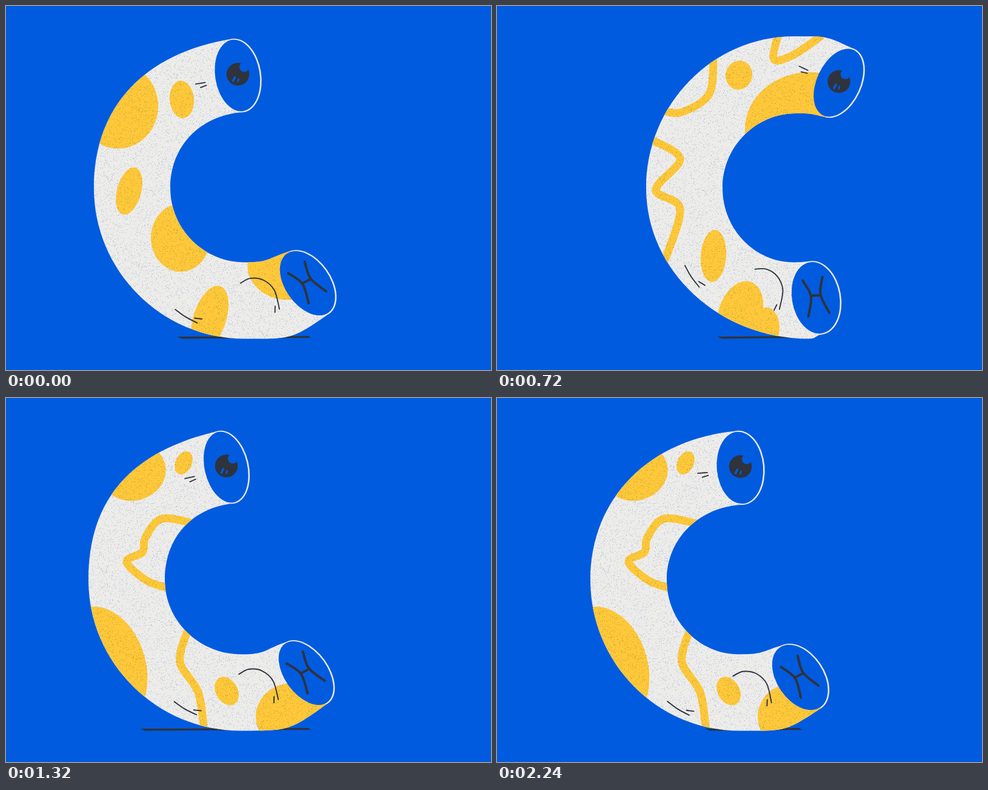
Write an HTML page with a canvas that moves like this. It is 800 by 600 pixels and loops after 2.37 s.

```html
<!DOCTYPE html>
<html lang="en">
<head>
<meta charset="utf-8">
<title>Swaying C</title>
<style>
  html, body { margin: 0; width: 100%; height: 100%; overflow: hidden; background: #005bdf; }
  canvas { display: block; width: 800px; height: 600px; }
</style>
</head>
<body>
<canvas id="stage" width="800" height="600"></canvas>
<script>
const BLUE = '#005bdf', PAPER = '#edece9', YELLOW = '#ffc83a', INK = '#2f333d';
const ctx = document.getElementById('stage').getContext('2d');
const rad = deg => deg * Math.PI / 180;

// A pose is the left edge, the start of the ground line and the two open ends.
const end = (x, y, rx, deg) => ({ x, y, rx, ry: 61, deg });
const pose = (left, ground, eye, mouth) => ({ left, ground, eye, mouth });
const low = pose(145, 282, end(382.5, 114.5, 38, -9), end(498, 457, 38, -35));
const rise = pose(155, 291, end(402, 115.5, 41.5, -5), end(500, 460.5, 39.5, -33));
const tip = pose(229, 336, end(532, 122.5, 40, 16), end(524, 481.5, 39.5, -14));
const peak = pose(246, 363, end(564, 126.5, 37, 25), end(526.5, 481, 40.5, -10));
const fall = pose(154, 343, end(401.5, 115, 39.5, -5), end(500.5, 460.5, 39.5, -34));

function mix(a, b, t) {
  if (typeof a === 'number') return a + (b - a) * t;
  return Object.fromEntries(Object.keys(a).map(k => [k, mix(a[k], b[k], t)]));
}
const back = mix(low, fall, -1);
const near = mix(tip, peak, .7);
const turn = mix(fall, peak, .55);

// Coats, with x counted from the left edge: spots are x, y, rx, ry, tilt; bands are curves.
const cow = {
  spots: [[40, 165, 66, 70, 0], [145, 154, 20, 31, -5], [58, 305, 20, 40, 15],
    [143, 382, 49, 56, 0], [191, 515, 27, 56, 18], [315, 432, 62, 52, 10]],
  bands: []
};
const cap = {
  spots: [[150, 100, 115, 64, -12], [67, 243, 38, 29, -35], [120, 322, 46, 46, 0],
    [10, 420, 58, 96, -18], [150, 454, 26, 35, -25], [243, 443, 26, 53, -4], [234, 563, 58, 47, 0]],
  bands: []
};
const cloud = {
  spots: [[61, 138, 41, 25, 10], [16, 304, 42, 37, 0], [20, 372, 51, 48, 0],
    [176, 428, 48, 66, 20], [193, 510, 13, 21, 38]],
  bands: ['101 89 156 108 209 82 221 48', '218 182 171 172 135 192 91 186 85 215 133 264']
};
const zigzag = {
  spots: [[153, 114, 22, 24, 15], [270, 203, 107, 94, 0], [111, 412, 21, 43, 4],
    [155, 508, 36, 56, 18], [198, 530, 22, 33, 0]],
  bands: ['218 46 211 88 244 80 288 50', '111 86 104 145 59 175 28 173', '8 220 56 252 16 303 56 335 29 424']
};
const river = {
  spots: [[74, 122, 54, 47, -15], [157, 107, 13.5, 20, 25], [21, 445, 74, 103, -15],
    [228, 483, 18, 25, -30], [336, 525, 60, 55, 0]],
  bands: ['176 207 121 199 94 230 89 254 63 270 96 301 134 314', '164 382 151 435 181 485 191 550']
};

const goRight = [[rise, cap, 130], [tip, cloud, 130], [near, cloud, 130]];
const goLeft = [[turn, zigzag, 130], [fall, river, 130], [low, cow, 130], [back, river, 200]];
const blink = [[peak, zigzag, 70], [peak, zigzag, 70, true], [peak, zigzag, 70]];
const steps = [
  ...goLeft.slice(2), ...goRight, ...blink,
  ...goLeft, ...goRight, [peak, zigzag, 200], ...goLeft.slice(0, 2)
];
const loop = steps.reduce((sum, s) => sum + s[2], 0);

function makeGrain() {
  const tile = document.createElement('canvas'), g = tile.getContext('2d');
  tile.width = tile.height = 256;
  g.fillStyle = '#c6d6f0';
  let seed = 7;
  const rnd = () => (seed = seed * 16807 % 2147483647) / 2147483647;
  for (let i = 0; i < 5000; i++) g.fillRect(rnd() * 256 | 0, rnd() * 256 | 0, 1, 1);
  return ctx.createPattern(tile, 'repeat');
}
const grain = makeGrain();

// Catmull-Rom curve through "x y x y ..."
function line(text, width, color) {
  const n = text.split(' ').map(Number), last = n.length / 2 - 1;
  const at = i => {
    const j = 2 * Math.min(last, Math.max(0, i));
    return [n[j], n[j + 1]];
  };
  ctx.beginPath();
  ctx.moveTo(...at(0));
  for (let i = 0; i < last; i++) {
    const z = at(i - 1), a = at(i), b = at(i + 1), c = at(i + 2);
    ctx.bezierCurveTo(a[0] + (b[0] - z[0]) / 6, a[1] + (b[1] - z[1]) / 6,
      b[0] - (c[0] - a[0]) / 6, b[1] - (c[1] - a[1]) / 6, ...b);
  }
  ctx.lineWidth = width;
  ctx.strokeStyle = color;
  ctx.stroke();
}
function oval(x, y, rx, ry, deg, color) {
  ctx.beginPath();
  ctx.ellipse(x, y, rx, ry, rad(deg), 0, 7);
  ctx.fillStyle = color;
  ctx.fill();
}

// Point on an end's rim where the tangent has the given angle; side 1 is the top.
function rim(e, side, angle) {
  const a = rad(angle - e.deg), r = rad(e.deg);
  const nx = Math.sin(a) * e.rx, ny = -Math.cos(a) * e.ry, len = Math.hypot(nx, ny) * side;
  const u = e.rx * nx / len, v = e.ry * ny / len;
  return [e.x + u * Math.cos(r) - v * Math.sin(r), e.y + u * Math.sin(r) + v * Math.cos(r)];
}
// Round curve from p, leaving at angle a, to q, arriving at angle b
function swing(p, a, q, b) {
  const dx = Math.abs(q[0] - p[0]), dy = Math.abs(q[1] - p[1]);
  const handle = (from, angle, sign) => {
    const c = Math.cos(rad(angle)), s = Math.sin(rad(angle));
    const k = .55 * sign * (dx * Math.abs(c) + dy * Math.abs(s));
    return [from[0] + c * k, from[1] + s * k];
  };
  ctx.bezierCurveTo(...handle(p, a, 1), ...handle(q, b, -1), ...q);
}
function bodyPath({ left, eye, mouth }) {
  const tilt = eye.deg, droop = mouth.deg;
  const brow = rim(eye, 1, tilt), lid = rim(eye, -1, tilt / 2);
  const chin = rim(mouth, -1, droop), lip = rim(mouth, 1, droop / 2);
  const crown = tilt > 0 ? [brow[0] - 4 * tilt, 50] : brow;
  const throat = tilt > 0 ? [lid[0] - 2 * tilt, 177] : lid;
  const spine = [left, 300], belly = [left + 126, 300];
  const foot = [mouth.x + 25 + 3.7 * droop, 548.5];
  const lap = [mouth.x - 10 + 2.7 * droop, 422.5];
  ctx.beginPath();
  ctx.moveTo(...brow);
  swing(brow, 180 + tilt, crown, 180);
  swing(crown, 180 + Math.min(0, tilt), spine, 90);
  swing(spine, 90, foot, 0);
  swing(foot, 0, chin, droop);
  ctx.lineTo(...lip);
  swing(lip, 180 + droop / 2, lap, 180);
  swing(lap, 180, belly, 270);
  swing(belly, 270, throat, Math.min(0, tilt / 2));
  swing(throat, 0, lid, tilt / 2);
  ctx.closePath();
}

function drawGround(from) {
  ctx.beginPath();
  ctx.moveTo(from, 545);
  ctx.lineTo(499, 544);
  ctx.lineTo(503, 547);
  ctx.lineTo(from + 8, 548.5);
  ctx.fillStyle = INK;
  ctx.fill();
}
function drawCoat({ spots, bands }, left) {
  ctx.save();
  ctx.translate(left, 0);
  spots.forEach(spot => oval(...spot, YELLOW));
  bands.forEach(band => line(band, 13, YELLOW));
  ctx.globalCompositeOperation = 'multiply';
  ctx.fillStyle = grain;
  ctx.fillRect(-left, 0, 800, 600);
  ctx.restore();
}
function drawPupil(x, y, shut) {
  ctx.save();
  ctx.translate(x, y);
  if (shut) {
    line('-18 1 0 8 18 1', 3.5, INK);
  } else {
    oval(0, 0, 18.7, 18.7, 0, INK);
    oval(10.5, -12, 8, 8, 0, BLUE);
    line('-8 11 -5 5', 3.5, BLUE);
    line('0 12 1 8', 2.5, BLUE);
  }
  ctx.restore();
}
// Pen strokes that turn with one end of the tube
function drawMarks(e, marks, width) {
  ctx.save();
  ctx.translate(e.x, e.y);
  ctx.rotate(rad(e.deg));
  marks.forEach(mark => line(mark, width, INK));
  ctx.restore();
}
const wrinkles = ['-71 3 -55 3', '-64 10 -54 8'];
const creases = ['-91 -64 -73 -61 -57 -46 -52 -22 -63 8', '-66 0 -72 8',
  '-204 -90 -197 -70 -187 -51', '-186 -60 -177 -52'];
const lips = ['-17 -32 -8 -4 -18 28', '16 -32 8 -4 17 28', '-8 -5 8 -3'];

function draw([p, coat, , shut]) {
  const ends = [p.eye, p.mouth];
  ctx.fillStyle = BLUE;
  ctx.fillRect(0, 0, 800, 600);
  ctx.lineCap = ctx.lineJoin = 'round';
  drawGround(p.ground);

  ctx.fillStyle = PAPER;
  bodyPath(p);
  ctx.fill();
  ends.forEach(e => oval(e.x, e.y, e.rx + .5, e.ry + .3, e.deg, PAPER));

  ctx.save();
  bodyPath(p);
  ctx.clip();
  drawCoat(coat, p.left);
  ctx.restore();

  ends.forEach(e => oval(e.x - .7, e.y, e.rx - 1.3, e.ry - 1.5, e.deg, BLUE));
  drawPupil(p.eye.x, p.eye.y - 2, shut);
  drawMarks(p.eye, wrinkles, 1.8);
  drawMarks(p.mouth, creases, 1.9);
  drawMarks(p.mouth, lips, 4);
}

let shown = -1;
const start = performance.now();
function tick() {
  let t = (performance.now() - start) % loop, i = 0;
  while (t >= steps[i][2]) t -= steps[i++][2];
  if (i !== shown) draw(steps[shown = i]);
  requestAnimationFrame(tick);
}
tick();
</script>
</body>
</html>
```
